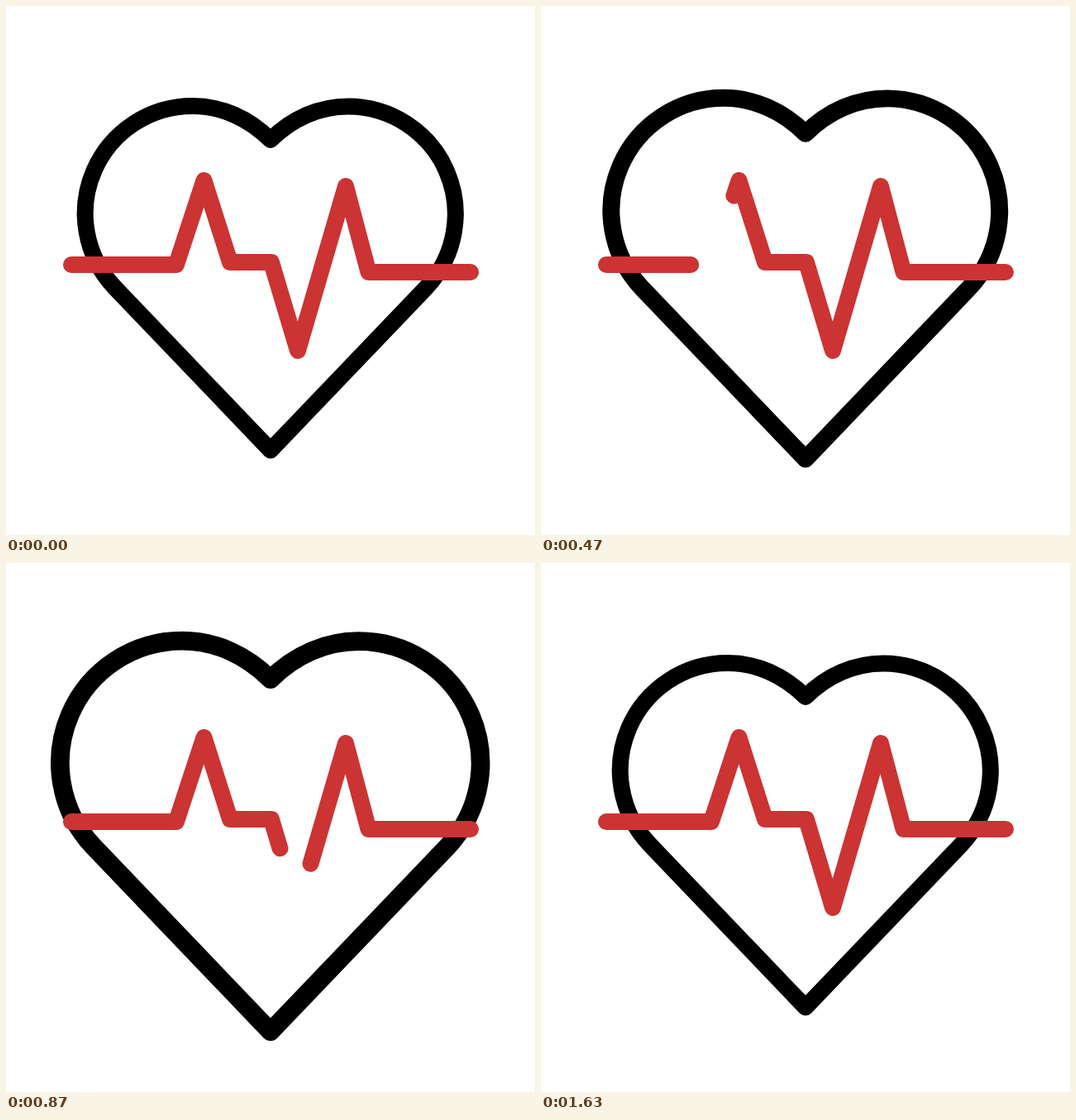
An HTML page for the animation above (1.67 s loop, 640 by 640 pixels).

```html
<!DOCTYPE html>
<html lang="en">
<head>
<meta charset="utf-8">
<title>Heartbeat</title>
<style>
  html, body { margin: 0; width: 100%; height: 100%; overflow: hidden; background: #fff; }
  svg { display: block; width: 100%; height: 100%; }
  path { fill: none; stroke-width: 20; stroke-linecap: round; stroke-linejoin: round; }
  #heart { stroke: #000; }
  .pulse { stroke: #cc3333; }
</style>
</head>
<body>
<svg viewBox="0 0 640 640">
  <path id="heart" d="M320 537.5L131 340A130 130 0 0 1 226 121C261 121 294 136 320 162C346 136 379 121.5 414 121.5A130 130 0 0 1 509 340Z"/>
  <path id="drawn" class="pulse" pathLength="1"/>
  <path id="erased" class="pulse" pathLength="1"/>
</svg>
<script>
  const LOOP = 1670, FPS = 30, LAST = 49;
  const [heart, drawn, erased] = ['heart', 'drawn', 'erased'].map(id => document.getElementById(id));
  for (const line of [drawn, erased]) {
    line.setAttribute('d', 'M79 313H206L239.5 211L271 310H321L353 417L411 218L438.5 322H562');
  }

  // Keys are [step, value]
  const beat = [[0, 1], [6.5, 0.904], [12, 1.09], [18, 0.93], [25, 1.14], [34, 1], [LAST, 1]];
  const head = [[6, 0], [7, 0.002], [14, 0.109], [19, 0.238], [26, 0.453], [33, 0.673], [48, 0.964]];
  const tail = [[0, 0], [7, 0.063], [14, 0.229], [19, 0.375], [26, 0.592], [33, 0.796], [46, 1]];

  const segment = (keys, x) => Math.max(0, keys.findIndex(key => x <= key[0]) - 1);

  function eased(keys, x) {
    const i = segment(keys, x), [x0, y0] = keys[i], [x1, y1] = keys[i + 1];
    const u = (x - x0) / (x1 - x0);
    return y0 + (y1 - y0) * u * u * (3 - 2 * u);
  }

  // Smooth curve through the keys, held flat outside them
  function curve(keys, x) {
    const end = keys.length - 1;
    if (x <= keys[0][0]) return keys[0][1];
    if (x >= keys[end][0]) return keys[end][1];
    const gap = i => keys[i + 1][0] - keys[i][0];
    const rate = i => (keys[i + 1][1] - keys[i][1]) / gap(i);
    const slope = i =>
      i === 0 ? 2 * rate(0) - slope(1) :
      i === end ? 2 * rate(end - 1) - slope(end - 1) :
      (rate(i - 1) * gap(i) + rate(i) * gap(i - 1)) / (gap(i - 1) + gap(i));
    const i = segment(keys, x), h = gap(i), u = (x - keys[i][0]) / h, v = 1 - u;
    return keys[i][1] * v * v * (1 + 2 * u) + slope(i) * h * u * v * v
      + keys[i + 1][1] * u * u * (3 - 2 * u) - slope(i + 1) * h * u * u * v;
  }

  function draw(step) {
    const scale = eased(beat, step);
    heart.setAttribute('transform', `translate(320 320) scale(${scale}) translate(-320 -320)`);

    const to = step === LAST ? 1 : curve(head, step);
    drawn.style.visibility = to > 0 ? 'visible' : 'hidden';
    drawn.setAttribute('stroke-dasharray', `${to} 2`);

    const from = curve(tail, step);
    erased.style.visibility = from < 1 ? 'visible' : 'hidden';
    erased.setAttribute('stroke-dasharray', '1.1 2');
    erased.setAttribute('stroke-dashoffset', -from);
  }

  const start = performance.now();
  function tick() {
    const time = (performance.now() - start) % LOOP;
    draw(Math.min(LAST, Math.floor((time + 5) * FPS / 1000)));
    requestAnimationFrame(tick);
  }
  tick();
</script>
</body>
</html>
```
